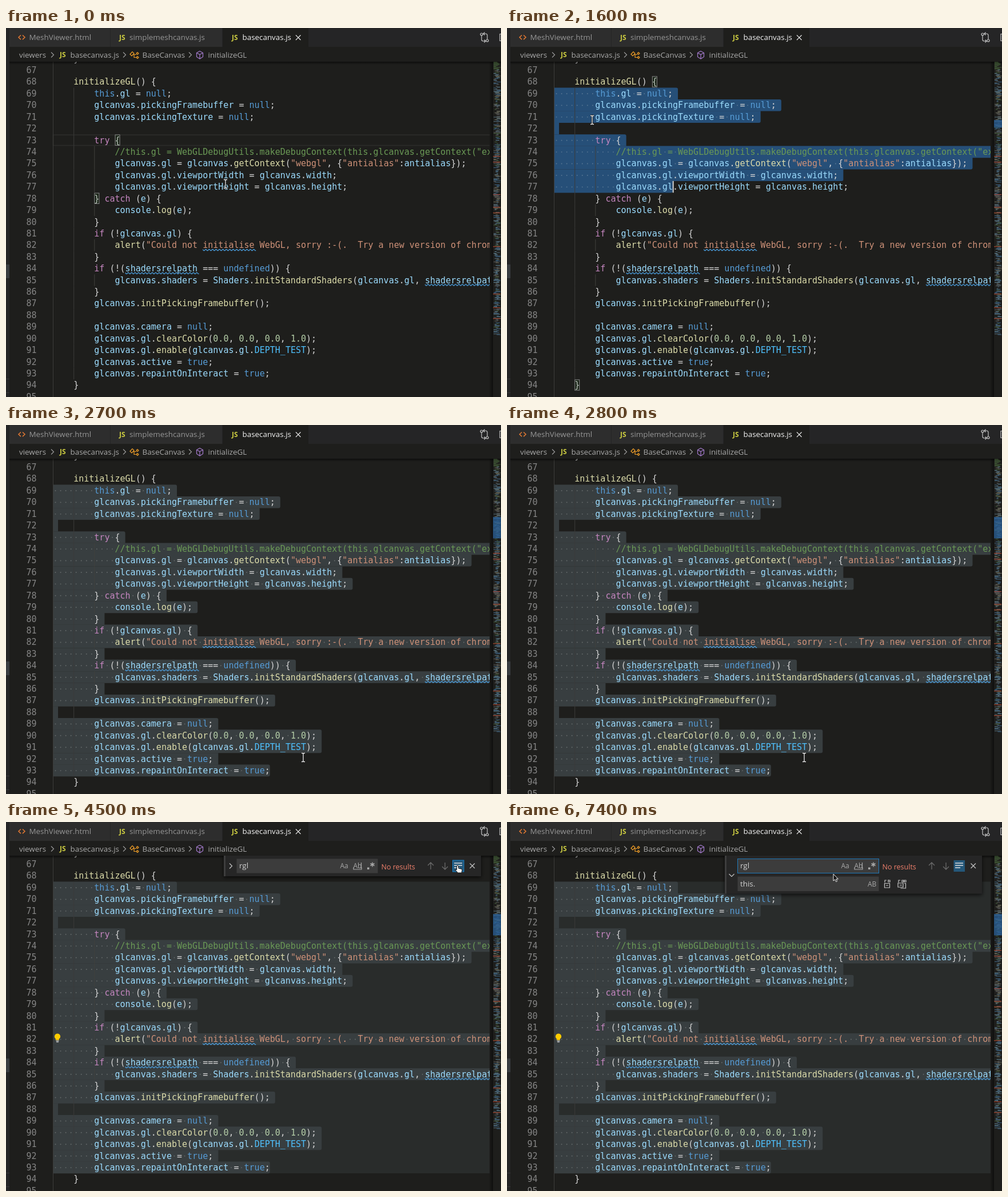
Recreate the animation shown at these times as an HTML page. Size 866 px wide and 646 px high, loop 8 s.

```html
<!DOCTYPE html>
<html lang="en">
<head>
<meta charset="utf-8">
<title>Editor: find and replace</title>
<style>
html, body { margin: 0; width: 100%; height: 100%; overflow: hidden; background: #1e1e1c; }
svg { display: block; width: 866px; height: 646px; }
text { white-space: pre; }
.code { font: 15.02px "DejaVu Sans Mono", monospace; fill: #d4d4d4; }
.ui { font: 13.4px "Open Sans", "Noto Sans", sans-serif; fill: #a9a9a9; }
.line { fill: none; stroke: #c5c5c5; stroke-width: 1.2; }
</style>
</head>
<body>
<svg viewBox="0 0 866 646" xmlns="http://www.w3.org/2000/svg">
  <defs>
    <clipPath id="pane"><rect x="6" y="59" width="840" height="587"/></clipPath>
    <clipPath id="below"><rect x="360" y="59" width="490" height="100"/></clipPath>
    <linearGradient id="side"><stop offset="0" stop-color="#000" stop-opacity=".1"/><stop offset="1" stop-color="#000" stop-opacity=".5"/></linearGradient>
    <linearGradient id="top" x2="0" y2="1"><stop offset="0" stop-color="#000" stop-opacity=".55"/><stop offset="1" stop-color="#000" stop-opacity="0"/></linearGradient>
    <filter id="shade" x="-10%" y="-30%" width="120%" height="180%"><feDropShadow dx="0" dy="2" stdDeviation="3.5" flood-color="#000" flood-opacity=".75"/></filter>
  </defs>
  <rect width="866" height="646" fill="#1e1e1c"/>
  <g clip-path="url(#pane)">
    <g id="back"></g>
    <g id="guides"></g>
    <g id="text"></g>
    <g id="front"></g>
  </g>
  <rect x="6" y="59" width="860" height="5" fill="url(#top)"/>
  <g id="map"></g>
  <rect id="mapSel" x="852" y="161" width="14" fill="#2a64a0" opacity=".7"/>
  <rect x="846" y="59" width="6" height="587" fill="url(#side)"/>
  <g id="chrome"></g>
  <g clip-path="url(#below)"><g id="widget"></g></g>
  <g id="mouse"></g>
</svg>
<script>
const LOOP = 8000, X0 = 82, CW = 9.043, LH = 20.42, FIRST = 66, RIGHT = 846;
const CODE = `    }

    initializeGL() {
        this.gl = null;
        glcanvas.pickingFramebuffer = null;
        glcanvas.pickingTexture = null;

        try {
            //this.gl = WebGLDebugUtils.makeDebugContext(this.glcanvas.getContext("experimental
            glcanvas.gl = glcanvas.getContext("webgl", {"antialias":antialias});
            glcanvas.gl.viewportWidth = glcanvas.width;
            glcanvas.gl.viewportHeight = glcanvas.height;
        } catch (e) {
            console.log(e);
        }
        if (!glcanvas.gl) {
            alert("Could not initialise WebGL, sorry :-(.  Try a new version of chrome or firefox");
        }
        if (!(shadersrelpath === undefined)) {
            glcanvas.shaders = Shaders.initStandardShaders(glcanvas.gl, shadersrelpath);
        }
        glcanvas.initPickingFramebuffer();

        glcanvas.camera = null;
        glcanvas.gl.clearColor(0.0, 0.0, 0.0, 1.0);
        glcanvas.gl.enable(glcanvas.gl.DEPTH_TEST);
        glcanvas.active = true;
        glcanvas.repaintOnInteract = true;
    }
`.split("\n");

// Token classes, tried in order.
const TOKENS = [
  [/^\/\/.*/, "#6a9955"],
  [/^"[^"]*"?/, "#ce9178"],
  [/^(try|catch|if)\b/, "#c586c0"],
  [/^(this|null|true|undefined)\b/, "#569cd6"],
  [/^\d+\.\d+/, "#b5cea8"],
  [/^[A-Z]+_[A-Z]+/, "#4fc1ff"],
  [/^\w+(?=\()/, "#dcdcaa"],
  [/^\w+/, "#9cdcfe"],
  [/^[^\w"\/]+/, "#d4d4d4"],
];

const el = id => document.getElementById(id);
const esc = s => s.replace(/&/g, "&amp;").replace(/</g, "&lt;").replace(/>/g, "&gt;");
const lineOf = row => CODE[row - FIRST] ?? "";
const rowY = row => 104.5 + (row - 69) * LH;
const colX = col => X0 + col * CW;
const clamp = (v, a, b) => Math.min(b, Math.max(a, v));
const rect = (x, y, w, h, fill, more = "") =>
  `<rect x="${x}" y="${y}" width="${w}" height="${h}" fill="${fill}" ${more}/>`;
const path = (d, more = "") => `<path class="line" d="${d}" ${more}/>`;
const label = (x, y, s, fill, more = "") =>
  `<text class="ui" x="${x}" y="${y}" style="fill:${fill};${more}">${esc(s)}</text>`;

function paint(line) {
  let out = "";
  while (line) {
    const [re, color] = TOKENS.find(([r]) => r.test(line)) || [/^./, "#d4d4d4"];
    const word = line.match(re)[0];
    out += `<tspan fill="${color}">${esc(word)}</tspan>`;
    line = line.slice(word.length);
  }
  return out;
}

function squiggle(row, word) {
  const col = lineOf(row).indexOf(word), y = rowY(row) + 17.6;
  let d = `M${colX(col)} ${y}`;
  for (let i = 0; i < word.length * CW / 3; i++) d += `l1.5 ${i % 2 ? -2 : 2}l1.5 0`;
  return path(d, 'style="stroke:#4a9fe0"');
}

function drawCode() {
  let text = "", guides = rect(X0, 59, 1, 587, "#3c3c3a");
  CODE.forEach((line, i) => {
    const row = FIRST + i, y = rowY(row);
    const base = y + 15.4;
    text += `<text class="code" x="${X0}" y="${base}">${paint(line)}</text>`;
    if (row > 66) text += `<text class="code" x="53.5" y="${base}" text-anchor="end" style="fill:#858585">${row}</text>`;
    if (row > 68 && row < 94) guides += rect(colX(4), y, 1, LH, "#3c3c3a");
    if (line.startsWith(" ".repeat(12))) guides += rect(colX(8), y, 1, LH, "#40403e");
  });
  text += squiggle(82, "initialise") + squiggle(84, "shadersrelpath") + squiggle(85, "shadersrelpath");
  el("text").innerHTML = text;
  el("guides").innerHTML = guides;
}

function drawMap() {
  let seed = 7, out = "";
  const rnd = () => (seed = (seed * 16807) % 2147483647) / 2147483647;
  const colors = ["#7fa9c4", "#9cdcfe", "#b0b096", "#569cd6", "#8f8f8f"];
  for (let i = 0; i < 319; i++) {
    const note = i < 9 || rnd() < .12, depth = 1 + Math.floor(rnd() * 4) * 1.8;
    if (rnd() < .12) continue;
    const x = 852 + (i < 9 ? 1 : depth);
    out += rect(x, 59.5 + i * 1.5, (866 - x) * (.3 + rnd() * .7), 1,
      note ? "#5f8f4d" : colors[Math.floor(rnd() * 5)], 'opacity=".55"');
  }
  for (const y of [224, 234, 291, 313, 323, 382, 465, 489, 508])
    out += rect(852, y, 13, 1.3, "#b5482f", 'opacity=".8"');
  el("map").innerHTML = out;
}

function drawChrome() {
  const js = (x, y) => label(x, y, "JS", "#cbcb41", "font-size:12px;font-weight:700");
  const sep = x => path(`M${x} 42.5l4.5 4.5l-4.5 4.5`, 'style="stroke:#9a9a9a"');
  const crumb = (x, s) => label(x, 51.5, s, "#a9a9a9");
  el("chrome").innerHTML =
    rect(0, 0, 6, 646, "#252526") + rect(0, 414, 6, 24, "#3a3d41") +
    rect(0, 614, 6, 1, "#3a3a3a") + rect(0, 638, 6, 1, "#3a3a3a") +
    rect(6, 0, 860, 33, "#252526") + rect(6, 0, 176, 33, "#2d2d2d") +
    rect(183, 0, 195, 33, "#2d2d2d") + rect(379, 0, 150, 33, "#1e1e1c") +
    path("M26 12.5l-4 3.8l4 3.8M29 12.5l4 3.8l-4 3.8", 'style="stroke:#e37933;stroke-width:1.5"') +
    label(40.5, 21, "MeshViewer.html", "#969696") +
    js(198, 20.5) + label(216, 21, "simplemeshcanvas.js", "#969696") +
    js(395, 20.5) + label(413.5, 21, "basecanvas.js", "#f4f4f4") +
    path("M507 12.5l8.5 8.5M515.500 12.5l-8.5 8.5", 'style="stroke:#eee"') +
    path("M832 13v7q0 3 3 3h4m-2.500-2.500l2.500 2.500l-2.500 2.500M842 20v-7q0-3-3-3h-4m2.500-2.500l-2.500 2.500l2.500 2.500") +
    `<g class="line"><circle cx="832" cy="11" r="2"/><circle cx="842" cy="22" r="2"/></g>` +
    path("M867 10.500h-3v12h3") +
    crumb(23, "viewers") + sep(79) + js(94, 51) + crumb(112.5, "basecanvas.js") + sep(205) +
    path("M217 46l4-4.500l3 3l-4 4.500zM222 46.500h6M224 46.500v5h4M228 44.500l2-2l2 2l-2 2zM228 51.500l2-2l2 2l-2 2z", 'style="stroke:#ee9d28"') +
    crumb(238.5, "BaseCanvas") + sep(320) +
    path("M339 40.500l5.500 3v7l-5.500 3.500l-5.500-3.500v-7zM333.500 43.500l5.500 3l5.500-3M339 46.500v7", 'style="stroke:#a37acc"') +
    crumb(353.5, "initializeGL");
}

// Pointer hot spot: time, x, y.
const KEYS = [
  [0, 384, 273], [100, 350, 250], [300, 210, 160], [600, 103, 118], [800, 90, 115],
  [1300, 85, 115], [1500, 104, 128], [1600, 149, 161], [1700, 290, 278], [1800, 410, 420],
  [1900, 502, 526], [2000, 518, 565], [2100, 520, 600], [2300, 520, 582], [2900, 520, 582],
  [3200, 600, 290], [3400, 631, 206], [3500, 631, 206], [3700, 794, 79], [4200, 790, 77],
  [4700, 790, 77], [4900, 690, 90], [5200, 410, 88], [5400, 393, 84], [5900, 393, 90],
  [6100, 450, 78], [6500, 476, 78], [6600, 476, 78], [6900, 396, 78], [7000, 396, 78],
  [7200, 470, 83], [7400, 571, 91], [LOOP, 571, 91],
];

function mouseAt(t) {
  const i = Math.max(1, KEYS.findIndex(k => k[0] >= t));
  const [a, b] = [KEYS[i - 1], KEYS[i]], p = (t - a[0]) / (b[0] - a[0]);
  return [a[1] + (b[1] - a[1]) * p, a[2] + (b[2] - a[2]) * p];
}

// The text caret runs one step ahead of the drawn pointer.
function caretAt(t) {
  const [x, y] = mouseAt(clamp(t + 100, 900, 2100));
  const row = clamp(69 + Math.floor((y - rowY(69)) / LH), 69, 93);
  return [row, t < 1300 ? 0 : clamp(Math.round((x - X0) / CW), 0, lineOf(row).length)];
}

function selection(row, col, color) {
  const end = r => r < 69 || r > row ? 0 : r === row ? col : lineOf(r).length + 1;
  let out = "";
  for (let r = 69; r <= row; r++) {
    const n = end(r);
    if (!n) continue;
    const y = rowY(r), x = colX(n), a = end(r - 1) < n ? 3 : 0, b = end(r + 1) < n ? 3 : 0;
    out += `<path fill="${color}" d="M${X0} ${y}H${x - a}q${a} 0 ${a} ${a}V${y + LH + .15 - b}q0 ${b} ${-b} ${b}H${X0}z"/>`;
    [...lineOf(r).slice(0, n)].forEach((ch, i) => {
      if (ch === " ") out += `<circle cx="${colX(i + .5)}" cy="${y + 10.5}" r=".95" fill="#e3e4e2" opacity=".27"/>`;
    });
  }
  return out;
}

const bracket = (row, col) =>
  rect(colX(col) + .5, rowY(row) + .8, CW - 1, LH - 2, "rgba(0,100,0,.1)", 'stroke="#888"');

const bulb = `<path fill="#ffcc00" d="M90 370.500a5 5 0 0 1 2.800 9.200v2h-5.600v-2a5 5 0 0 1 2.800-9.200z"/>` +
  rect(87.5, 382.5, 5, 1.2, "#d8d8d8") + rect(88, 384.5, 4, 1.2, "#d8d8d8");

function drawEditor(t) {
  const dragging = t >= 900, [row, col] = caretAt(t), focused = t < 2500;
  const lineRow = t < 900 ? 73 : 69;
  let back = "", front = "";
  if (t < 1300) back += rect(X0 + .5, rowY(lineRow) + 1, 780, LH - 2, "none", 'stroke="#2b2b29" stroke-width="1.8"');
  if (t >= 4400) back += rect(X0, rowY(69), RIGHT - X0, LH * 25, "#292c2b");
  if (dragging) back += selection(row, col, focused ? "#264f78" : "#383e40");
  if (t < 900) front += bracket(73, 12) + bracket(78, 8);
  else if (t < 1700) front += bracket(68, 19) + bracket(94, 4);
  if (dragging && focused) front += rect(colX(col) - .3, rowY(row), 2, LH, "#d0d0ce");
  if (t >= 3400) front += bulb;
  el("back").innerHTML = back;
  el("front").innerHTML = front;
  el("mapSel").setAttribute("height", dragging && col ? (row - 68) * 1.5 : 0);
}

function drawWidget(t) {
  if (t < 2900) return el("widget").innerHTML = "";
  const wide = t >= 5500, toggled = t >= 4400, hover = t >= 3700 && t < 4800;
  const findFocus = t < 4400 || t >= 6300, mx = mouseAt(t)[0];
  const grey = "#a8a8a8", dim = 'style="stroke:#6b6b6b;stroke-width:1.3"';
  const small = (x, y, s) => label(x, y, s, grey, "font-size:12px");
  const selLeft = t < 4400 ? 408 : t < 6700 ? 426 : clamp(mx, 408, 426);
  let out = `<g filter="url(#shade)">${rect(381, 56, 450, wide ? 69.5 : 39, "#252526")}</g>` +
    rect(381, 56, 3, wide ? 69.5 : 39, "#3d3d3d") +
    rect(403.5, 64.5, 247, 25, "#3c3c3c", findFocus ? 'stroke="#1f78b8"' : "") +
    path(wide ? "M388.500 91l4.500 4.500l4.500-4.500" : "M391 72.500l4.500 4.500l-4.500 4.500");
  if (findFocus && selLeft < 426) out += rect(selLeft, 69, 426 - selLeft, 17, "#2a68ae");
  if (t >= 6300 && t < 6700) out += rect(426, 69, 1, 16, "#d0d0d0");
  out += label(408, 81, "rgl", "#d0d0d0") + small(584.5, 81, "Aa") +
    small(607.5, 80.5, "Ab") + path("M621.500 71v10M608 79.500v3.500h14v-3.500", `style="stroke:${grey}"`) +
    rect(632, 79.5, 3.5, 3.5, grey) +
    path("M641 70.500v8M637.500 72.500l7 4M644.500 72.500l-7 4", `style="stroke:${grey};stroke-width:1.5"`) +
    label(656.5, 82.5, "No results", "#f0806c", "font-size:12.5px") +
    path("M743 83v-12m-5 5l5-5l5 5", dim) + path("M768 71v12m-5-5l5 5l5-5", dim);
  if (toggled) out += rect(781.5, 67, 19.5, 20, "#245779", hover ? 'stroke="#1683cc"' : "");
  out += path("M784 72h14M784 76h14M784 80h9", 'style="stroke:#ddd;stroke-width:1.5"') +
    path("M811.500 72.500l8.500 8.500M820 72.500l-8.500 8.500");
  if (wide) {
    out += rect(403.5, 95.5, 247, 25.5, "#3c3c3c") + label(408, 112.5, "this.", "#d0d0d0") +
      small(631, 113, "AB") +
      path("M661 106v-4h3M660.500 107.500h9v7.500h-9zM663 111h4M667 101v4h3v-3h-3", "") +
      path("M685 106v-4h3M684 107h9v7h-9zM687 110.500h4M691 102v3h3v-3zM695 102v3h3v-3zM695 107.500h2.500v8.500h-9") ;
    if (t < 6300) out += rect(384.5, 60.5, 17.5, 63, "none", 'stroke="#2478b5"');
  }
  el("widget").innerHTML = out;
  el("widget").setAttribute("transform", `translate(0 ${-45 * clamp((3100 - t) / 200, 0, 1)})`);
}

const SHAPES = {
  beam: path("M-3-7.500h2l1 1l1-1h2M0-6.500v13M-3 7.500h2l1-1l1 1h2", 'style="stroke:#111;stroke-width:3"') +
    path("M-3-7.500h2l1 1l1-1h2M0-6.500v13M-3 7.500h2l1-1l1 1h2", 'style="stroke:#f2f2f2;stroke-width:1.3"'),
  arrow: `<path d="M0 0v12l2.700-2.400l2 4l2-1l-2-3.700h3.600z" fill="#111" stroke="#f2f2f2"/>`,
  hand: `<path d="M-1.500 0q1.500-1.500 3 0v4l5.500 1.300q1.300.5 1 2.200l-1 4.500h-6.500l-4.500-5q.5-1.800 2.500-.3z" fill="#f5f5f5" stroke="#111"/>`,
};

function drawMouse(t) {
  const [x, y] = mouseAt(t), low = t >= 5500 ? 126 : 95;
  const inside = t >= 2900 && y < low && x > 381 && x < 831;
  const onInput = x > 403 && x < 651 && y > 64 && y < 90;
  const onButton = x < 403 || (x > 781 && x < 802 && y > 66 && y < 88);
  const kind = !inside || onInput ? "beam" : onButton ? "hand" : "arrow";
  el("mouse").innerHTML = SHAPES[kind];
  el("mouse").setAttribute("transform", `translate(${x} ${y})`);
}

let shown = -1;
function frame(now) {
  const t = Math.floor((now % LOOP) / 100) * 100;
  if (t !== shown) {
    shown = t;
    drawEditor(t);
    drawWidget(t);
    drawMouse(t);
  }
  requestAnimationFrame(frame);
}

drawCode();
drawMap();
drawChrome();
const start = performance.now();
frame(0);
requestAnimationFrame(function loop() {
  frame(Math.max(0, performance.now() - start));
});
</script>
</body>
</html>
```
